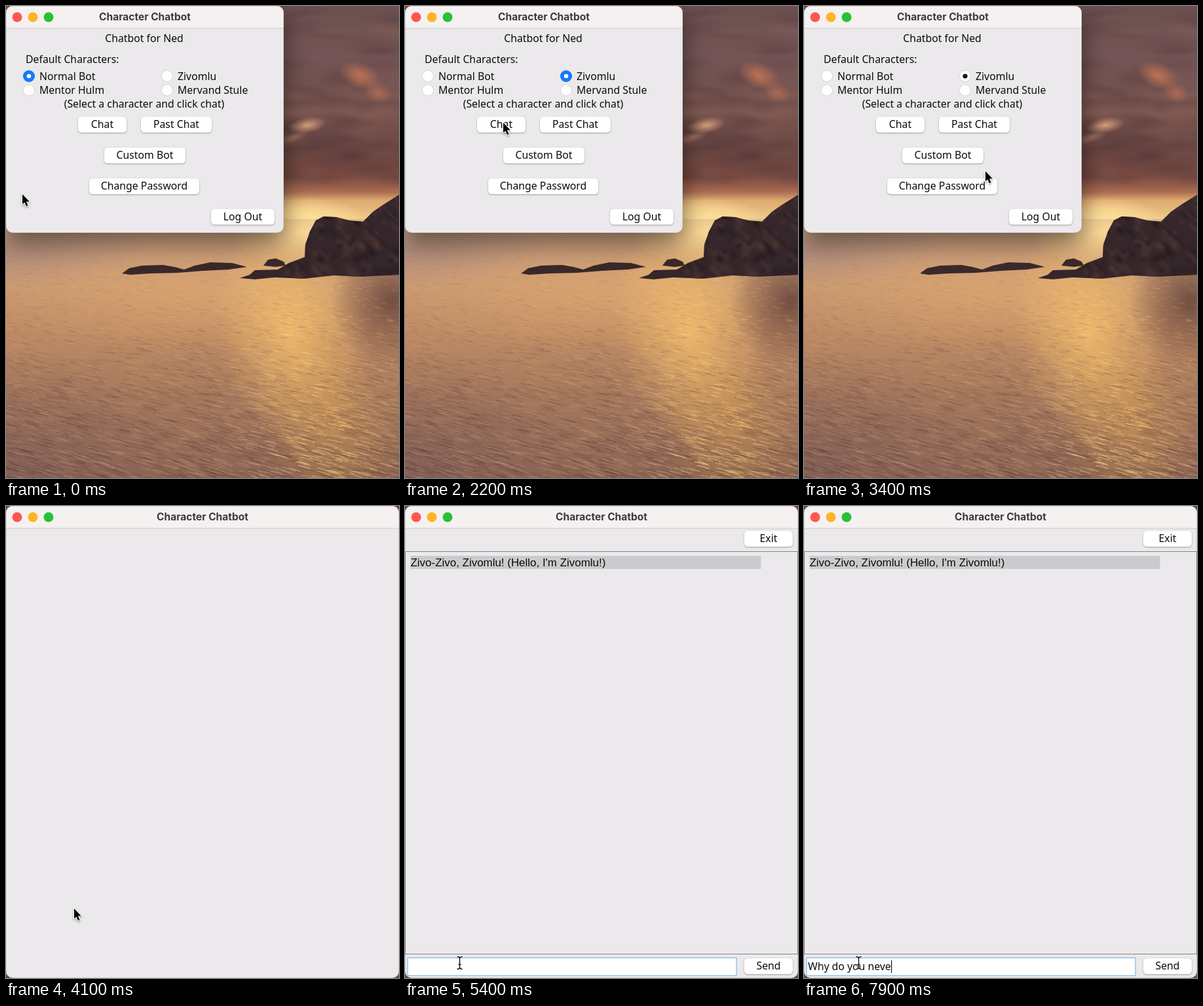
Animation, 600 px wide and 720 px high, one loop 8 s. Source, as an HTML page with a canvas:

```html
<!DOCTYPE html>
<html lang="en">
<head>
<meta charset="utf-8">
<title>Character Chatbot</title>
<style>
  html, body { margin: 0; width: 100%; height: 100%; overflow: hidden; background: #5d4444; }
  canvas { display: block; width: 600px; height: 720px; }
</style>
</head>
<body>
<canvas id="stage" width="600" height="720"></canvas>
<script>
const W = 600, H = 720, LOOP = 8000, STEP = 100;
const ctx = document.getElementById('stage').getContext('2d');
const UI = '15.8px "Noto Sans", "Open Sans", sans-serif';
const TITLE = '700 15.5px Inter, sans-serif';
const CHAT = '16.95px "Liberation Sans", Arial, sans-serif';
const BODY = '#ebe9eb';

const PICK = 1500, DIALOG_OPEN = 2300, DIALOG_CLOSE = 3000, CHAT_OPEN = 3600, CHAT_READY = 4600;

// Cursor stops: time, x, y
const PATH = [
  [0, 25, 287], [500, 25, 287], [1100, 252, 104], [1600, 252, 104], [2000, 150, 178],
  [2300, 150, 178], [2700, 263, 248], [3000, 263, 248], [3200, 277, 252], [3900, 277, 252],
  [4100, 104, 614], [4300, 83, 697], [LOOP, 83, 697]
];

// Typed text: time, characters visible
const MESSAGE = 'Why do you neve';
const KEYS = [
  [5700, 1], [5900, 2], [6100, 3], [6200, 4], [6500, 5], [6700, 6], [6800, 7], [6900, 8],
  [7000, 9], [7200, 10], [7300, 11], [7500, 12], [7700, 14], [7900, 15]
];

function random(seed) {
  return () => {
    seed = (seed * 1664525 + 1013904223) >>> 0;
    return seed / 4294967296;
  };
}

function fade(g, gradient, stops) {
  stops.forEach(([at, color]) => gradient.addColorStop(at, color));
  return gradient;
}

function glow(g, x, y, rx, ry, rgb, alpha, angle = 0) {
  g.save();
  g.translate(x, y);
  g.rotate(angle);
  g.scale(rx, ry);
  g.fillStyle = fade(g, g.createRadialGradient(0, 0, 0, 0, 0, 1), [
    [0, `rgba(${rgb},${alpha})`], [0.5, `rgba(${rgb},${alpha * 0.5})`], [1, `rgba(${rgb},0)`]
  ]);
  g.fillRect(-1, -1, 2, 2);
  g.restore();
}

function polygon(g, points, color) {
  g.beginPath();
  points.forEach(([x, y]) => g.lineTo(x, y));
  g.closePath();
  g.fillStyle = color;
  g.fill();
}

function paintSky(g, rnd) {
  g.fillStyle = fade(g, g.createLinearGradient(0, 0, 0, 326), [
    [0, '#6c5050'], [0.25, '#755556'], [0.5, '#7b5650'], [0.66, '#684543'],
    [0.8, '#76493f'], [0.87, '#aa6c52'], [0.91, '#deaa70'], [1, '#f0cb8c']
  ]);
  g.fillRect(0, 0, W, 326);
  for (let i = 0; i < 60; i++) {
    const rgb = rnd() < 0.55 ? '70,45,48' : '150,105,92';
    glow(g, 400 + rnd() * 200, rnd() * 265, 25 + rnd() * 45, 7 + rnd() * 13, rgb, 0.22, -0.15 + rnd() * 0.3);
  }
  glow(g, 540, 106, 34, 20, '215,125,85', 0.75, 0.4);
  glow(g, 568, 132, 22, 16, '205,118,82', 0.6, 0.4);
  glow(g, 460, 182, 30, 12, '235,175,130', 0.85, -0.15);
  glow(g, 440, 200, 25, 8, '205,145,115', 0.5, -0.3);
  glow(g, 455, 322, 90, 28, '255,226,150', 0.8);
}

function paintSea(g, rnd) {
  g.fillStyle = fade(g, g.createLinearGradient(0, 325, 0, H), [
    [0, '#d9b088'], [0.12, '#c69a7b'], [0.25, '#cb9a72'], [0.45, '#bd8a64'],
    [0.7, '#a3775c'], [1, '#8a6454']
  ]);
  g.fillRect(0, 325, W, H - 325);
  glow(g, 20, 370, 190, 60, '160,128,122', 0.55);
  glow(g, 455, 345, 110, 55, '255,224,155', 0.9);
  glow(g, 290, 440, 300, 90, '228,172,110', 0.5);
  glow(g, 435, 500, 115, 190, '250,196,108', 0.75, -0.2);
  glow(g, 500, 640, 110, 140, '220,160,85', 0.45, -0.3);
  glow(g, 590, 450, 95, 100, '85,55,52', 0.75);
  glow(g, 20, 700, 230, 180, '120,88,86', 0.45);

  g.lineCap = 'round';
  for (let i = 0; i < 3600; i++) {
    const depth = Math.pow(rnd(), 0.75), x = rnd() * 640 - 20, y = 350 + depth * 375;
    const len = 4 + depth * (8 + rnd() * 16), drop = len * (0.1 + 0.2 * depth);
    const lit = Math.exp(-Math.pow((x - 430 - depth * 50) / 110, 2));
    const bright = rnd() < 0.46;
    g.strokeStyle = bright
      ? `rgba(255,${200 + lit * 20 | 0},${150 - lit * 20 | 0},${0.13 + lit * 0.25})`
      : `rgba(90,58,58,${0.09 + depth * 0.16})`;
    g.lineWidth = 0.6 + depth * 1.1;
    g.beginPath();
    g.moveTo(x, y);
    g.quadraticCurveTo(x + len / 2, y + drop * 0.2, x + len, y + drop);
    g.stroke();
  }
}

function paintRocks(g, rnd) {
  const headland = [
    [357, 415], [372, 410], [380, 403], [415, 402], [432, 392], [456, 383], [457, 364], [464, 344],
    [473, 327], [485, 321], [504, 322], [524, 327], [545, 329], [560, 314], [576, 303], [600, 288],
    [600, 410], [540, 413], [500, 411], [455, 416], [410, 414], [380, 417]
  ];
  polygon(g, headland, '#34262a');
  g.save();
  g.clip();
  for (let i = 0; i < 150; i++) {
    const rgb = rnd() < 0.5 ? '92,62,54' : '28,19,23';
    glow(g, 430 + rnd() * 170, 295 + rnd() * 120, 5 + rnd() * 16, 3 + rnd() * 8, rgb, 0.4, 0.8);
  }
  g.restore();
  polygon(g, [[393, 396], [400, 387], [412, 385], [424, 390], [427, 396], [412, 398]], '#3a292a');
  polygon(g, [
    [177, 408], [188, 400], [208, 396], [240, 395], [257, 398], [272, 402], [288, 396], [312, 391],
    [345, 392], [368, 398], [340, 402], [300, 404], [262, 407], [220, 408], [190, 410]
  ], '#3a2929');
}

function makeDesktop() {
  const layer = document.createElement('canvas');
  layer.width = W;
  layer.height = H;
  const g = layer.getContext('2d'), rnd = random(77);
  paintSky(g, rnd);
  paintSea(g, rnd);
  paintRocks(g, rnd);
  return layer;
}

const desktop = makeDesktop();

function text(str, x, y, { font = UI, color = '#0c0c0c', align = 'left' } = {}) {
  ctx.font = font;
  ctx.fillStyle = color;
  ctx.textAlign = align;
  ctx.fillText(str, x, y);
}

function box(x, y, w, h, r) {
  ctx.beginPath();
  ctx.roundRect(x, y, w, h, r);
}

function disc(x, y, r, color) {
  ctx.beginPath();
  ctx.arc(x, y, r, 0, Math.PI * 2);
  ctx.fillStyle = color;
  ctx.fill();
}

function shadow(blur, dy, alpha) {
  ctx.shadowColor = `rgba(0,0,0,${alpha})`;
  ctx.shadowBlur = blur;
  ctx.shadowOffsetY = dy;
}

function frameWindow(x, y, w, h, title, active, lights) {
  ctx.save();
  shadow(active ? 36 : 24, active ? 14 : 8, 0.5);
  box(x, y, w, h, 10);
  ctx.fillStyle = BODY;
  ctx.fill();
  ctx.restore();
  ctx.save();
  box(x, y, w, h, 10);
  ctx.clip();
  ctx.fillStyle = active ? '#f4f1f0' : '#e9e7e7';
  ctx.fillRect(x, y, w, 34);
  ctx.fillStyle = '#d3d0d1';
  ctx.fillRect(x, y + 33.5, w, 1.2);
  ctx.restore();
  box(x + 0.25, y + 0.25, w - 0.5, h - 0.5, 10);
  ctx.strokeStyle = 'rgba(90,80,80,.35)';
  ctx.lineWidth = 0.5;
  ctx.stroke();
  lights.forEach((color, i) => {
    disc(x + 17 + i * 24, y + 17, 7.5, color ? color : '#bdbbbc');
    if (!color) disc(x + 17 + i * 24, y + 17, 6.8, '#d0ced0');
  });
  text(title, x + w / 2, y + 22, { font: TITLE, color: active ? '#3d3a3b' : '#a9a6a7', align: 'center' });
}

function button(label, x, y, w, h = 24, fill = '#fff') {
  ctx.save();
  shadow(2.5, 1, 0.32);
  box(x, y, w, h, 5.5);
  ctx.fillStyle = fill;
  ctx.fill();
  ctx.restore();
  text(label, x + w / 2, y + 17.3, { align: 'center' });
}

function radio(label, x, y, mark, active) {
  disc(x, y, 8.9, '#cfcdd0');
  disc(x, y, 8.2, active ? '#fff' : '#f0eef0');
  if (mark === 'blue') {
    disc(x, y, 9, '#1479fb');
    disc(x, y, 3.3, '#fff');
  } else if (mark === 'black') {
    disc(x, y, 3.6, '#161616');
  }
  text(label, x + 16, y + 5.5);
}

const LIGHTS = ['#fd5750', '#fdb525', '#28c136'];

function drawMenu(t) {
  const active = t < DIALOG_OPEN || t >= DIALOG_CLOSE;
  const picked = t < PICK ? '' : t < DIALOG_OPEN ? 'blue' : 'black';
  frameWindow(0, 0, 424, 346, 'Character Chatbot', active, active ? LIGHTS : ['', '', '']);
  text('Chatbot for Ned', 211, 55, { align: 'center' });
  text('Default Characters:', 30, 86.5);
  radio('Normal Bot', 35, 107, t < PICK ? 'blue' : '', active);
  radio('Zivomlu', 246, 107, picked, active);
  radio('Mentor Hulm', 35, 128.5, '', active);
  radio('Mervand Stule', 246, 128.5, '', active);
  text('(Select a character and click chat)', 211, 155, { align: 'center' });
  const fill = active ? '#fff' : '#f7f6f7';
  button('Chat', 110, 169, 74, 24, fill);
  button('Past Chat', 206, 169, 108, 24, fill);
  button('Custom Bot', 150, 216, 124, 24, fill);
  button('Change Password', 127, 263, 168, 24, fill);
  button('Log Out', 313, 309.5, 97, 24, fill);
}

function drawDialog() {
  frameWindow(54, 85, 314, 208, 'Message', true, [LIGHTS[0], '', '']);
  box(88, 140.5, 70.5, 73.5, 2);
  ctx.fillStyle = fade(ctx, ctx.createLinearGradient(0, 140, 0, 214), [[0, '#fdfdfd'], [1, '#b3b3b3']]);
  ctx.fill();
  ctx.strokeStyle = '#2c2c2c';
  ctx.lineWidth = 1.6;
  ctx.stroke();
  disc(123.5, 177.5, 24, '#0b0b0b');
  text('Starting Chat...', 195, 181);
  box(256, 241.5, 79.5, 25.5, 6);
  ctx.fillStyle = '#1479fb';
  ctx.fill();
  ctx.strokeStyle = '#8dbbee';
  ctx.lineWidth = 1;
  ctx.stroke();
  text('OK', 295, 259.3, { align: 'center' });
}

function drawChat(t) {
  frameWindow(0, 0, W, H, 'Character Chatbot', true, LIGHTS);
  if (t < CHAT_READY) return;
  button('Exit', 518, 38, 74);
  ctx.strokeStyle = '#858385';
  ctx.lineWidth = 1;
  ctx.strokeRect(0.5, 69.5, 599, 614);
  ctx.fillStyle = '#cbcacc';
  ctx.fillRect(8.5, 76, 535, 20);
  text("Zivo-Zivo, Zivomlu! (Hello, I'm Zivomlu!)", 8.5, 91.5, { font: CHAT });
  ctx.fillStyle = '#fff';
  ctx.fillRect(4, 689, 502, 27);
  ctx.strokeStyle = '#86b9e6';
  ctx.lineWidth = 1.2;
  ctx.strokeRect(4, 689.3, 502, 27);
  button('Send', 518, 690, 74);

  const count = KEYS.reduce((n, [at, chars]) => (t >= at ? chars : n), 0);
  if (!count) return;
  const typed = MESSAGE.slice(0, count);
  text(typed, 6, 708);
  ctx.fillStyle = '#111';
  ctx.fillRect(Math.round(6 + ctx.measureText(typed).width), 693, 1.2, 19);
}

function cursorAt(t) {
  const i = PATH.findIndex(([at]) => at > t);
  const [t0, x0, y0] = PATH[i - 1], [t1, x1, y1] = PATH[i];
  const p = (t - t0) / (t1 - t0), k = p * p * (3 - 2 * p);
  return [x0 + (x1 - x0) * k, y0 + (y1 - y0) * k];
}

function drawArrow(x, y) {
  ctx.save();
  ctx.translate(x, y);
  ctx.beginPath();
  [[0, 0], [0, 15.5], [3.4, 12.4], [6, 18.6], [8.6, 17.5], [6, 11.5], [10.8, 11.2]]
    .forEach(([px, py]) => ctx.lineTo(px, py));
  ctx.closePath();
  ctx.lineJoin = 'round';
  ctx.lineWidth = 2.2;
  ctx.strokeStyle = '#fff';
  shadow(3, 1.5, 0.35);
  ctx.stroke();
  ctx.shadowColor = 'transparent';
  ctx.fillStyle = '#000';
  ctx.fill();
  ctx.restore();
}

function drawIBeam(x, y) {
  ctx.save();
  ctx.translate(x + 0.5, y);
  ctx.beginPath();
  for (const s of [-1, 1]) {
    ctx.moveTo(-4, s * 9.5);
    ctx.quadraticCurveTo(-0.5, s * 9.5, 0, s * 7);
    ctx.quadraticCurveTo(0.5, s * 9.5, 4, s * 9.5);
  }
  ctx.moveTo(0, -7.5);
  ctx.lineTo(0, 7.5);
  ctx.moveTo(-2, 2.5);
  ctx.lineTo(2, 2.5);
  ctx.strokeStyle = '#fff';
  ctx.lineWidth = 3;
  ctx.stroke();
  ctx.strokeStyle = '#111';
  ctx.lineWidth = 1.4;
  ctx.stroke();
  ctx.restore();
}

function render(t) {
  ctx.drawImage(desktop, 0, 0);
  if (t >= CHAT_OPEN) {
    drawChat(t);
  } else {
    drawMenu(t);
    if (t >= DIALOG_OPEN && t < DIALOG_CLOSE) drawDialog();
  }
  const [x, y] = cursorAt(t);
  (t >= CHAT_READY ? drawIBeam : drawArrow)(x, y);
}

function tick() {
  const t = performance.now() % LOOP;
  render(Math.floor(t / STEP) * STEP);
  requestAnimationFrame(tick);
}
tick();
</script>
</body>
</html>
```
